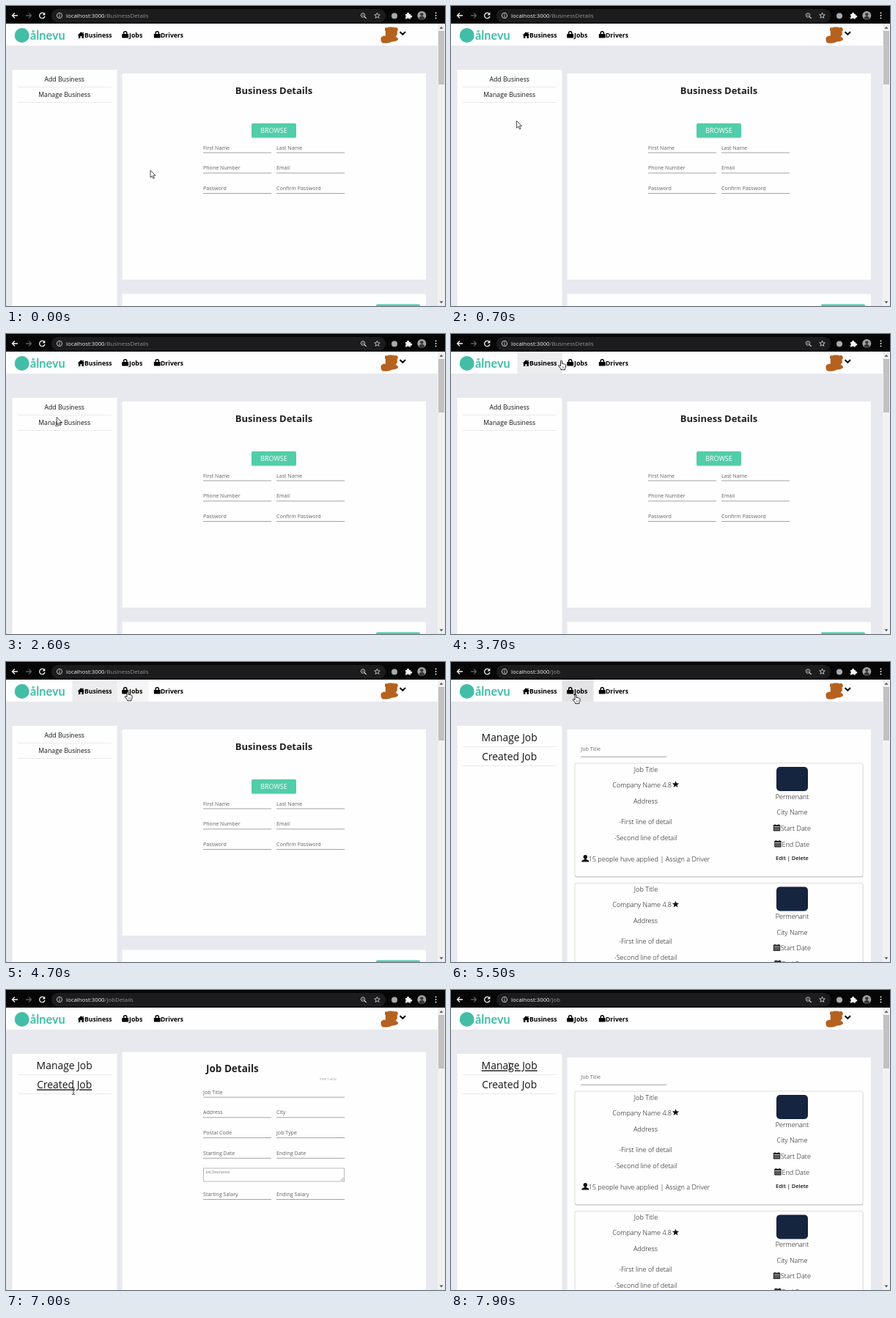
Animation of 599x409 px, one loop 8 s. Source, as an HTML page:

```html
<!DOCTYPE html>
<html lang="en">
<head>
<meta charset="utf-8">
<title>Dispatch dashboard</title>
<style>
  html, body { margin: 0; width: 100%; height: 100%; overflow: hidden; background: #e7e9ee; }
  svg { display: block; width: 599px; height: 409px; font-family: "Open Sans", "Noto Sans", sans-serif; }
</style>
</head>
<body>
<svg id="stage" viewBox="0 0 599 409"></svg>
<script>
const stage = document.getElementById('stage');

const rect = (x, y, w, h, fill, more = '') =>
  `<rect x="${x}" y="${y}" width="${w}" height="${h}" fill="${fill}" ${more}/>`;
const text = (s, x, y, size, fill = '#222', weight = 400, anchor = 'start', more = '') =>
  `<text x="${x}" y="${y}" font-size="${size}" fill="${fill}" font-weight="${weight}" text-anchor="${anchor}" ${more}>${s}</text>`;
const path = (d, fill = '#000', more = '') => `<path d="${d}" fill="${fill}" ${more}/>`;
const line = (d, color, width = 1.3) => path(d, 'none', `stroke="${color}" stroke-width="${width}"`);
const at = (x, y, body) => `<g transform="translate(${x} ${y})">${body}</g>`;
const rule = (x, y, w, color = '#a3a3a6') => rect(x, y, w, 1, color);
const panel = (y, h) => rect(158.5, y, 414.5, h, '#fefefe');

const field = (label, x, y, w = 93) => text(label, x, y, 7.1, '#626266') + rule(x, y + 4, w);
const pair = (a, b, y) => field(a, 269, y) + field(b, 369, y);

function browser() {
  return rect(0, 0, 599, 24, '#060606') + rect(62, 4, 456, 18.5, '#1c1c1e', 'rx="9"') +
    line('M16 13H8.5M12 9.5L8.5 13L12 16.5', '#f2f2f2') +
    line('M27 13H34.5M31 9.5L34.5 13L31 16.5', '#5c5c5c') +
    line('M52 10.5A3.7 3.7 0 1 0 53 14', '#f2f2f2') + path('M53.4 8.6V12.4H49.6Z', '#f2f2f2') +
    '<circle cx="73" cy="13" r="3.6" fill="none" stroke="#c9c9c9"/>' +
    rect(72.5, 12.5, 1, 2.8, '#c9c9c9') + rect(72.5, 10.7, 1, 1, '#c9c9c9') +
    '<circle cx="487" cy="12.5" r="2.7" fill="none" stroke="#c9c9c9"/>' +
    line('M489 14.5L491.7 17', '#c9c9c9') + line('M485.8 12.5H488.2', '#c9c9c9', .8) +
    at(506.5, 13.2, line(starPath(4), '#c9c9c9', .9)) +
    '<circle cx="530" cy="13.5" r="4" fill="#a9a9ab"/>' +
    path('M545 11H547.2A1.5 1.5 0 1 1 550 11H552V13A1.5 1.5 0 1 1 552 15.6V17.5H549.8A1.4 1.4 0 0 0 547.2 17.5H545V15.3A1.4 1.4 0 0 0 545 12.8Z', '#f4f4f4') +
    '<circle cx="567.3" cy="13" r="6" fill="#a2a2a5"/>' +
    path('M563.3 17.3Q564 13.8 567.3 13.8T571.3 17.3Q567.3 20.5 563.3 17.3Z', '#38383b') +
    '<circle cx="567.3" cy="11.4" r="2.2" fill="#38383b"/>' +
    [9.5, 13, 16.5].map(y => `<circle cx="586.5" cy="${y}" r=".95" fill="#eee"/>`).join('');
}

function starPath(r) {
  const points = Array.from({ length: 10 }, (_, i) => {
    const a = i * Math.PI / 5, d = i % 2 ? r * .42 : r;
    return `${(d * Math.sin(a)).toFixed(2)} ${(-d * Math.cos(a)).toFixed(2)}`;
  });
  return `M${points.join('L')}Z`;
}

const bag = rect(0, 3.6, 9, 5.6, '#000', 'rx=".8"') + line('M2.4 4.2V2.6A2.1 2.1 0 0 1 6.6 2.6V4.2', '#000', 1.4);
const house = path('M0 5L4.7 .3L6.6 2.2V.8H8V3.5L9.5 5H8.2V9H5.8V6H3.7V9H1.3V5Z');
const calendar = rect(0, .8, 9.4, 8.6, '#222', 'rx=".4"') + rect(.8, 3, 7.8, .9, '#eee') +
  [5.2, 7.1].map(y => rect(.9, y, 7.6, .8, '#aaa')).join('') +
  rect(1.6, 0, 1.2, 2, '#222') + rect(6.6, 0, 1.2, 2, '#222');
const person = '<circle cx="5" cy="2.8" r="2.7" fill="#111"/>' +
  path('M0 9.5V8.3Q.3 7.2 3.7 6V4H6.3V6Q9.7 7.2 10 8.3V9.5Z', '#111');

function navigation() {
  return rect(0, 24, 589, 30, '#fefefe') +
    rect(90.5, 24, 61, 30, '#e3e3e6', 'id="hoverBusiness"') +
    rect(151.5, 24, 43, 30, '#e3e3e6', 'id="hoverJobs"') +
    '<circle cx="21.7" cy="40" r="10" fill="#43bda6"/>' +
    text('ålnevu', 33, 46, 16.3, '#43bda6', 700, 'start', 'font-family="Lato, sans-serif"') +
    at(97.7, 35, house) + text('Business', 107, 43, 8.6, '#000', 700) +
    at(158.2, 34.3, bag) + text('Jobs', 168, 43, 8.8, '#000', 700) +
    at(201.8, 34.3, bag) + text('Drivers', 211, 43, 8.6, '#000', 700) +
    path('M517 31Q517 28.5 520 29.5Q525 27.5 530 29.5Q533 28 534.5 30.5Q535.5 33 533.5 35Q535 39.5 531.5 41.5Q535.5 43.5 535 46Q531 49 527 48.5Q522 51.5 514 50.5Q511 49 511.5 44Q512 40.5 518 40.5Q517 37 518 35Q516.5 33 517 31Z', '#b5621f') +
    line('M537.5 35.2L541.3 38.8L545 35.2', '#000', 2);
}

function scrollbar() {
  return rect(589, 24, 10, 385, '#f1f1f1') + rect(590, 34, 8, 73, '#c1c1c1') +
    path('M591.5 31L594 28L596.5 31Z', '#555') + path('M591.5 402.5L594 405.5L596.5 402.5Z', '#555');
}

function businessPage() {
  return panel(92, 281) + panel(392.5, 17) +
    text('Business Details', 365.5, 119.7, 13, '#212125', 700, 'middle') +
    rect(335, 161, 61, 19.3, '#b9c9c5', 'rx="2"') + rect(335, 160, 61, 19, '#52cda9', 'rx="2"') +
    text('BROWSE', 365.5, 172.7, 9, '#fff', 400, 'middle') +
    pair('First Name', 'Last Name', 195.5) +
    pair('Phone Number', 'Email', 223.3) +
    pair('Password', 'Confirm Password', 251) +
    rect(505, 406.5, 60, 8, '#52cda9', 'rx="2"');
}

function card(top) {
  const row = (s, x, y) => text(s, x, y, 9.15, '#080808', 300, 'middle');
  return at(0, top,
    rect(169, 1.2, 393.2, 154.4, '#b9b9bd', 'rx="2"') +
    rect(169, 0, 393, 154.5, '#fefefe', 'rx="2" stroke="#d2d2d6" stroke-width=".8"') +
    row('Job Title', 266, 11.5) +
    row('Company Name 4.8', 260.7, 33) + at(306.5, 29, path(starPath(5), '#111')) +
    row('Address', 265.5, 54.7) +
    row('-First line of detail', 265.5, 83) +
    row('-Second line of detail', 265.5, 105) +
    at(178.3, 125, person) + row('15 people have applied | Assign a Driver', 270.4, 133.5) +
    rect(444, 5, 43, 33, '#15243f', 'rx="5"') +
    row('Permenant', 465.5, 49) + row('City Name', 465.5, 70.3) +
    at(439.8, 83.2, calendar) + row('Start Date', 470.3, 92) +
    at(441.2, 105, calendar) + row('End Date', 470.2, 113.5) +
    text('Edit | Delete', 465.5, 132, 7.4, '#111', 600, 'middle'));
}

function jobsPage() {
  return panel(92, 317) + text('Job Title', 177.3, 121, 7.2, '#6a6a6e') + rule(177, 128.7, 117) +
    card(138) + card(301.4);
}

function detailsPage() {
  return panel(84.5, 324.5) + text('Job Details', 273, 112.3, 13.5, '#212125', 700) +
    text('STEP 1 of 02', 428, 122.5, 4, '#8b8b8f') +
    field('Job Title', 269, 141.7, 193) +
    pair('Address', 'City', 169.3) +
    pair('Postal Code', 'Job Type', 197) +
    pair('Starting Date', 'Ending Date', 224.8) +
    rect(269.5, 243, 192, 18, '#fefefe', 'stroke="#b2b2b6" stroke-width=".9"') +
    text('Job Description', 273, 250.3, 4.6, '#77777b') +
    line('M456.5 260L460.5 256M458.8 260L460.5 258.3', '#777', .7) +
    pair('Starting Salary', 'Ending Salary', 281);
}

// Sidebar links: page group, label, baseline, font size, half width
const links = [
  ['business', 'Add Business', 103, 8.75, 28], ['business', 'Manage Business', 124, 8.75, 37],
  ['job', 'Manage Job', 108.4, 13.9, 39], ['job', 'Created Job', 134.4, 13.9, 38]
];
const sidebar = kind => `<g id="side-${kind}">` + links.map(([k, label, y, size], i) =>
  k !== kind ? '' : text(label, 79.7, y, size, '#161619', 500, 'middle', `id="link${i}"`) +
    rule(16, Math.floor(y) + 7, 128, '#e8eaed')).join('') + '</g>';

const pages = { business: businessPage, jobs: jobsPage, details: detailsPage };
const pointers = {
  arrow: path('M0 0V9.8L2.3 7.7L3.9 11.3L5.5 10.6L3.9 7.1H7Z', '#fff', 'stroke="#222" stroke-width=".8"'),
  hand: path('M-1 .8Q0 -.6 1 .8V4.5Q2.3 3.7 2.8 4.8Q4.1 4.2 4.5 5.4Q5.8 5 6 6.2V9Q5.8 10.5 5 11.3V12.7H-.5V11.5L-4 7.4Q-3.2 5.7 -1 7.7Z', '#fff', 'stroke="#111" stroke-width=".9"') +
    line('M1.6 8V11M3.4 8V11', '#333', .5),
  beam: line('M-1.8 -4.5Q0 -4.5 0 -3.5Q0 -4.5 1.8 -4.5M0 -3.5V3.5M-1.8 4.5Q0 4.5 0 3.5Q0 4.5 1.8 4.5', '#222', .9)
};

stage.innerHTML = rect(0, 0, 599, 409, '#e7e9ee') + rect(8.5, 87, 143, 322, '#fefefe') +
  sidebar('business') + sidebar('job') +
  Object.entries(pages).map(([name, draw]) => `<g id="${name}">${draw()}</g>`).join('') +
  navigation() + scrollbar() + browser() +
  text('localhost:3000<tspan id="route" fill="#949498"></tspan>', 82, 16.2, 7.8, '#f1f1f1') +
  '<g id="pointer">' + Object.entries(pointers).map(([k, s]) => `<g id="${k}">${s}</g>`).join('') + '</g>';

const get = id => document.getElementById(id);
const show = (id, on) => get(id).setAttribute('display', on ? 'inline' : 'none');
const routes = { business: '/BusinessDetails', jobs: '/Job', details: '/JobDetails' };

// Each stop: time, then values
const trail = [
  [0, 197, 224], [1000, 60, 138], [1400, 60, 138], [1500, 52, 141], [2300, 62, 121],
  [3200, 90, 92], [3500, 128, 45], [3700, 150.5, 36], [4400, 150, 38], [4700, 166, 40],
  [5000, 167, 42], [5200, 170, 44], [5500, 170, 44], [6200, 95, 132], [6500, 92, 138],
  [7100, 92, 138], [7500, 80, 106], [7900, 80, 104]
];
const glowBusiness = [[3300, 0], [3700, .65], [4100, 1], [4500, 1], [5000, 0]];
const glowJobs = [[4500, 0], [5000, 1], [5600, 1], [6000, 0]];

function sample(stops, t) {
  if (t <= stops[0][0]) return stops[0].slice(1);
  const i = stops.findIndex(s => s[0] > t);
  if (i < 0) return stops[stops.length - 1].slice(1);
  const a = stops[i - 1], b = stops[i];
  const u = (t - a[0]) / (b[0] - a[0]), ease = u * u * (3 - 2 * u);
  return a.slice(1).map((v, k) => v + (b[k + 1] - v) * ease);
}

function render(t) {
  const page = t < 5400 ? 'business' : t >= 6400 && t < 7600 ? 'details' : 'jobs';
  const side = page === 'business' ? 'business' : 'job';
  for (const name in pages) show(name, name === page);
  for (const kind of ['business', 'job']) show('side-' + kind, kind === side);
  get('route').textContent = routes[page];
  get('hoverBusiness').setAttribute('opacity', sample(glowBusiness, t)[0]);
  get('hoverJobs').setAttribute('opacity', sample(glowJobs, t)[0]);

  const [x, y] = sample(trail, t);
  let pointer = y < 54 && x > 91 ? 'hand' : 'arrow';
  links.forEach(([kind, , base, size, half], i) => {
    const over = kind === side && Math.abs(x - 80) < half && y > base - size && y < base + size * .4;
    if (over) pointer = 'beam';
    get('link' + i).setAttribute('text-decoration', over ? 'underline' : 'none');
  });
  for (const name in pointers) show(name, name === pointer);
  get('pointer').setAttribute('transform', `translate(${x} ${y})`);
}

const start = performance.now();
function tick() {
  const t = (performance.now() - start) % 8000;
  render(Math.floor(t / 100) * 100);
  requestAnimationFrame(tick);
}
tick();
</script>
</body>
</html>
```
